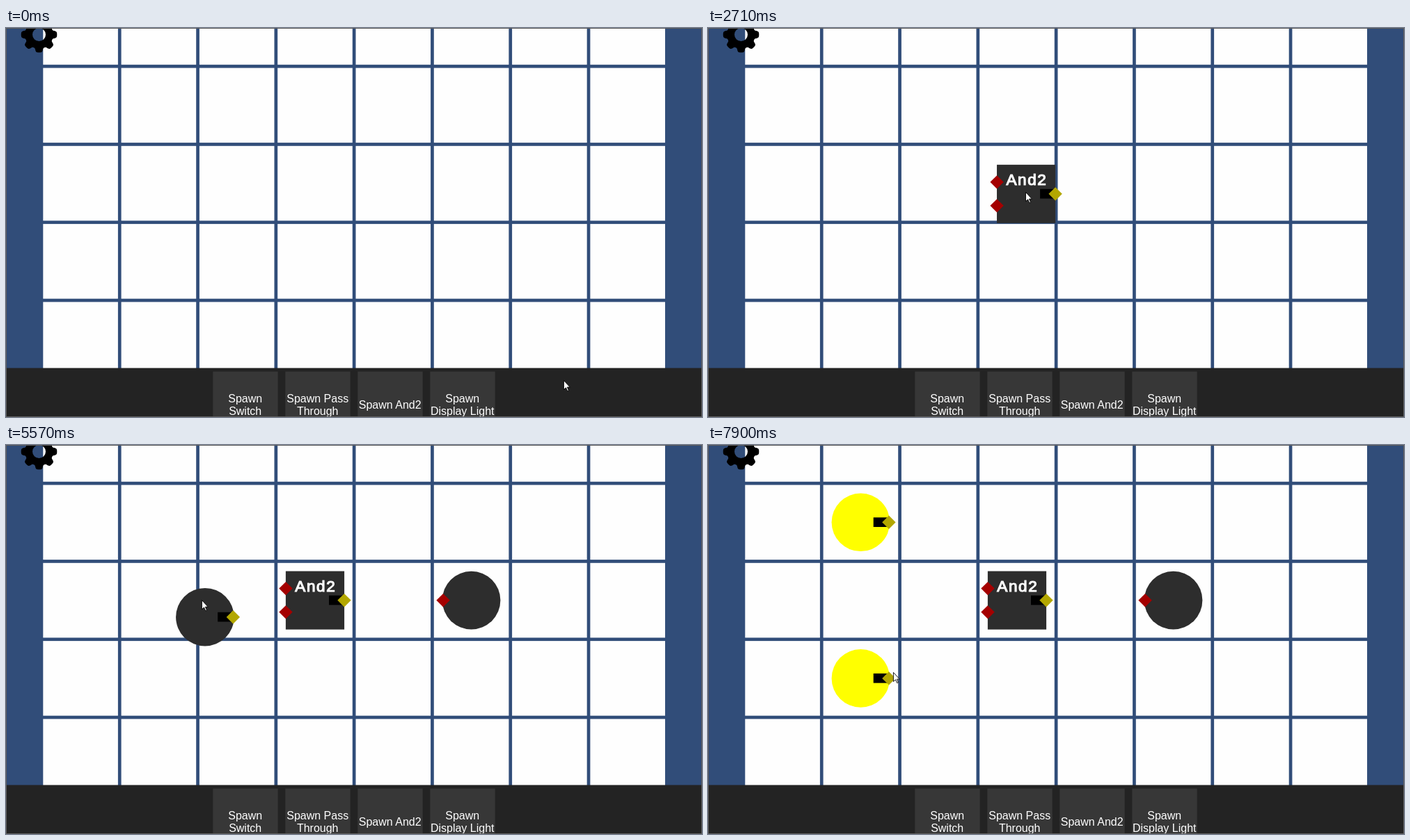
These frames come from a looping animation (1000 by 560 pixels, 8000 ms). An HTML page:

```html
<!DOCTYPE html>
<html lang="en">
<head>
<meta charset="utf-8">
<title>Logic board</title>
<style>
html, body { margin: 0; width: 100%; height: 100%; overflow: hidden; background: #314d79; }
svg { display: block; width: 1000px; height: 560px; }
text { font-family: "Liberation Sans", Arial, sans-serif; fill: #fff; }
.label { font-size: 16px; text-anchor: middle; }
.title { font-size: 22.5px; letter-spacing: 1.6px; stroke: #fff; stroke-width: 1.2px; }
.body { fill: var(--body, #2d2d2d); }
.on { --body: #ff0; }
.in { fill: #a40000; }
.out { fill: #b3a700; }
</style>
</head>
<body>
<svg viewBox="0 0 1000 560">
  <defs>
    <path id="pin" d="M-9.7 0L0-9.7L9.7 0L0 9.7Z"/>
    <g id="switch">
      <circle class="body" r="41.8"/>
      <rect x="18.3" y="-7" width="20" height="13.7"/>
      <use href="#pin" x="40.5" class="out"/>
    </g>
  </defs>
  <rect width="1000" height="560" fill="#314d79"/>
  <g id="cells" fill="#fefefe"></g>

  <g id="and">
    <rect class="body" x="-42.1" y="-42" width="84.2" height="84"/>
    <rect x="20" y="-7" width="20" height="13.7"/>
    <text class="title" x="-28.7" y="-12.6">And2</text>
    <use href="#pin" x="-42" y="-17" class="in"/>
    <use href="#pin" x="-42" y="17" class="in"/>
    <use href="#pin" x="42" class="out"/>
  </g>
  <g id="light">
    <circle class="body" r="41.8"/>
    <use href="#pin" x="-40.5" class="in"/>
  </g>
  <g id="switchA"><use href="#switch"/></g>
  <g id="switchB"><use href="#switch"/></g>

  <rect y="489.5" width="1000" height="70.5" fill="#232323"/>
  <g id="buttons"></g>
  <path id="gear" fill-rule="evenodd"/>
  <rect x=".5" y=".5" width="999" height="559" fill="none" stroke="#5c5c5c"/>
  <path id="cursor" d="M.4.4V13.6L3.5 10.8L5.6 15.6L7.5 14.8L5.4 10.1H9.3Z" fill="#fff" stroke="#000" stroke-width=".9"/>
</svg>
<script>
const LOOP = 8000, STEP = 120, LAG = 50;
const PITCH = 112.3, CELL = 107.6, LEFT = 53.3, TOP = -54.8;
const $ = id => document.getElementById(id);

// The picture advances every STEP, counted anew from each of these times
const starts = [0, 1260, 2230, 2970, 3360, 3630, 4370, 5710, 5850, 6020, 6290, 6800, 7180];

// Key points of the pointer: [time, x, y]
const keys = [
  [1140, 801, 507], [1860, 567, 524.5], [2110, 567, 524.5],
  [2230, 511, 400], [2590, 459, 244], [2830, 455, 233],
  [3210, 579, 424], [3480, 645, 503], [3630, 648, 506],
  [4110, 645, 260], [4300, 668, 229],
  [5090, 443, 508], [5330, 345, 526], [5450, 300, 295],
  [5570, 281, 223], [5710, 279, 160], [5850, 228, 114],
  [6140, 228, 158], [6290, 297, 368], [6650, 344, 517], [6800, 345, 519],
  [7040, 245, 338], [7180, 222, 325], [7900, 266, 327]
];

// Each part trails the pointer from grab to drop, then sits in its cell
const parts = [
  { id: "and", grab: 2230, drop: 2970, col: 3, row: 2 },
  { id: "light", grab: 3750, drop: 4370, col: 5, row: 2 },
  { id: "switchA", grab: 5450, drop: 6020, col: 1, row: 1, lit: true },
  { id: "switchB", grab: 6920, drop: 7300, col: 1, row: 3, lit: true }
];

function snap(t) {
  const i = starts.findLastIndex(s => s <= t);
  const start = starts[i], next = starts[i + 1] ?? Infinity;
  const last = Math.floor((next - start) / STEP) - 1;
  return start + Math.min(Math.floor((t - start) / STEP), last) * STEP;
}

const slope = (i, c) =>
  i < 0 || i > keys.length - 2 ? 0 : (keys[i + 1][c] - keys[i][c]) / (keys[i + 1][0] - keys[i][0]);

// Harmonic mean of the neighbouring slopes: smooth, without overshoot
function tangent(i, c) {
  const a = slope(i - 1, c), b = slope(i, c);
  return a * b > 0 ? 2 * a * b / (a + b) : 0;
}

function pointer(t) {
  const i = keys.findLastIndex(k => k[0] <= t);
  if (i < 0) return keys[0].slice(1);
  if (i === keys.length - 1) return keys[i].slice(1);
  const span = keys[i + 1][0] - keys[i][0], u = (t - keys[i][0]) / span;
  return [1, 2].map(c =>
    keys[i][c] + (keys[i + 1][c] - keys[i][c]) * u * u * (3 - 2 * u) +
    span * u * (1 - u) * (tangent(i, c) * (1 - u) - tangent(i + 1, c) * u));
}

const place = (el, [x, y]) => el.setAttribute("transform", `translate(${x} ${y})`);
const cellCentre = (col, row) => [LEFT + CELL / 2 + col * PITCH, TOP + CELL / 2 + row * PITCH];

function draw(time) {
  const t = snap(time);
  place($("cursor"), pointer(t));
  for (const { id, grab, drop, col, row, lit } of parts) {
    const el = $(id), dropped = t >= drop;
    el.style.display = t < grab ? "none" : "";
    el.classList.toggle("on", !!lit && dropped);
    place(el, dropped ? cellCentre(col, row) : pointer(t - LAG));
  }
}

function gearPath(cx, cy) {
  const rim = Array.from({ length: 180 }, (_, i) => {
    const a = i * Math.PI / 90, r = 22.8 + 3 * Math.tanh(2 * Math.cos(8 * a) + 0.6);
    return `${(cx + r * Math.cos(a)).toFixed(2)} ${(cy + r * Math.sin(a)).toFixed(2)}`;
  });
  return `M${rim.join("L")}ZM${cx - 9.5} ${cy}a9.5 9.5 0 1 0 19 0a9.5 9.5 0 1 0-19 0Z`;
}

$("gear").setAttribute("d", gearPath(47.5, 9.5));
$("cells").innerHTML = Array.from({ length: 40 }, (_, i) =>
  `<rect x="${LEFT + i % 8 * PITCH}" y="${TOP + Math.floor(i / 8) * PITCH}" width="${CELL}" height="${CELL}"/>`
).join("");
$("buttons").innerHTML = [["Spawn", "Switch"], ["Spawn Pass", "Through"], ["Spawn And2"], ["Spawn", "Display Light"]]
  .map((lines, i) => {
    const x = 297.3 + i * 104, y = 548 - (lines.length - 1) * 8.8;
    return `<rect x="${x}" y="494.5" width="93.4" height="65.5" fill="#373737"/>` +
      lines.map((s, n) => `<text class="label" x="${x + 46.4}" y="${y + n * 17.6}">${s}</text>`).join("");
  }).join("");

let began;
function tick(now) {
  began ??= now;
  draw((now - began) % LOOP);
  requestAnimationFrame(tick);
}
draw(0);
requestAnimationFrame(tick);
</script>
</body>
</html>
```
